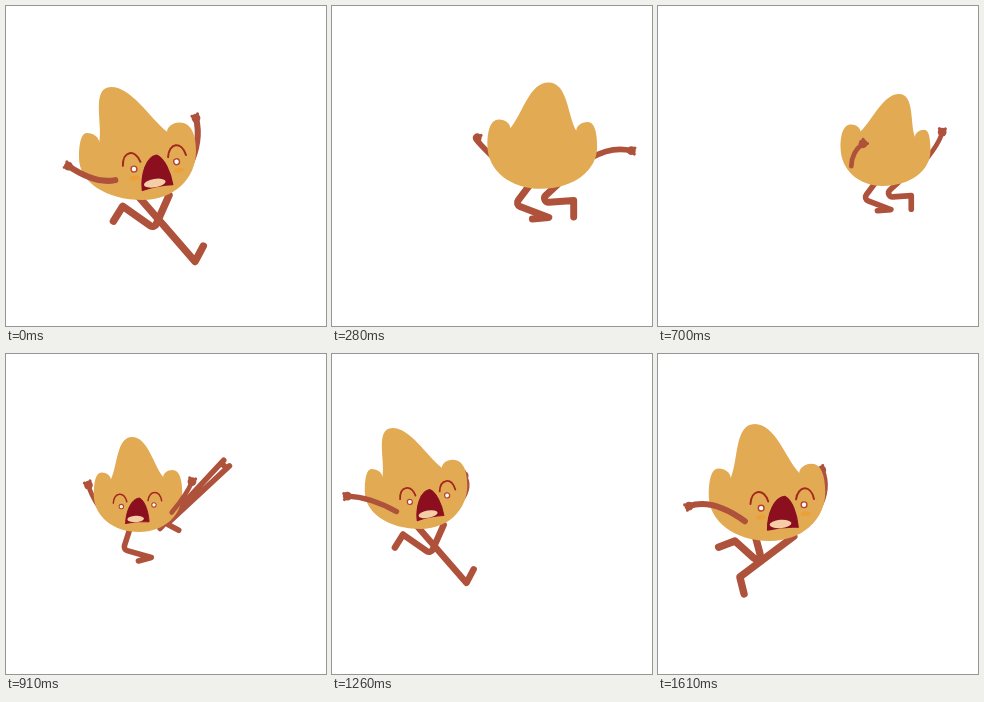
Recreate the animation shown at these times as an HTML page with a canvas. Size 320x320 px, loop 1.68 s.

```html
<!DOCTYPE html>
<html lang="en">
<head>
<meta charset="utf-8">
<title>Panic run</title>
<style>
  html, body { margin: 0; width: 100%; height: 100%; overflow: hidden; background: #fff; }
  canvas { display: block; width: 100vw; height: 100vh; }
</style>
</head>
<body>
<canvas id="stage" width="320" height="320"></canvas>
<script>
const ctx = document.getElementById('stage').getContext('2d');
const STEPS = 24, STEP_MS = 70;
const SKIN = '#e2aa53', LIMB = '#ae523c', DARK = '#8c0f1f', LINE = '#a5281f';

// step, body x, bottom y, height, then in body widths:
// lean of the top, face shift, left hand x,y, right hand x,y, left elbow bend
const KEYS = [
  [0, 131.5, 194, 113, -.226, .165, -.59, -.29, .5, -.7, -.1],
  [2, 221, 187, 110, -.07, .6, -.67, -.31, .82, -.31, .11],
  [6, 190.5, 180, 102, .15, 0, -.48, -.59, .74, -.46, .2],
  [10, 227.5, 180, 92, .15, -.75, -.25, -.47, .63, -.6, .07],
  [13, 132, 178, 95, -.067, 0, -.56, -.53, .61, -.57, .04],
  [16, 78, 175, 99, -.2, .12, -.67, -.36, .5, -.53, .06],
  [18, 84, 175, 101, -.23, .135, -.67, -.32, .47, -.52, .07],
  [23, 109, 187, 117, -.105, .14, -.67, -.3, .47, -.61, .14]
];

// A leg: hip x and thigh length in body widths, then thigh, shin and foot angles
// in degrees, as seen running to the right.
const REACH = [[0, .42, 49, 49, -62], [.27, .31, 114, 215, 122]];
const STRIDE = [
  REACH,
  [[.09, .25, 72, 164, 15], [-.25, .24, 47, 223, 152]],
  [[-.175, .16, 70, 70, 100], [.1, .18, 157, 42, 108]],
  REACH,
  [[.11, .23, 53, 159, 5], [-.14, .25, 43, 184, 90]],
  [[.23, .25, 143, 143, 76], [-.1, .27, 75, 222, 159]]
];
const SHIN = .33, FOOT = .15;

const mix = (a, b, u) => a + (b - a) * u;
const facesRight = i => i < 2 || i > 15;
const showsFace = i => i < 2 || i > 10;
const nearArm = i => facesRight(i) ? -1 : i > 11 ? 1 : i > 8 ? -1 : 0;

// Smooth looping curve through the key poses.
function poseAt(i) {
  const n = KEYS.length;
  const row = j => KEYS[(j + n) % n];
  const time = j => row(j)[0] + STEPS * Math.floor(j / n);
  let k = n - 1;
  while (KEYS[k][0] > i) k--;
  const span = time(k + 1) - time(k), u = (i - time(k)) / span;
  const slope = (j, c) => (row(j + 1)[c] - row(j - 1)[c]) / (time(j + 1) - time(j - 1));
  const [, x, y, h, lean, face, lx, ly, rx, ry, bend] = row(k).map((a, c) =>
    mix(a, row(k + 1)[c], u * u * (3 - 2 * u)) +
    span * u * (1 - u) * ((1 - u) * slope(k, c) - u * slope(k + 1, c)));
  // The run circles away from the viewer and back.
  const w = 102.5 + 14.5 * Math.cos(2 * Math.PI * i / STEPS);
  return { x, y, w, h, lean, face, left: [lx, ly], right: [rx, ry], bend };
}

function bodyPath({ w, h, lean }) {
  const top = [lean * w, -h], bottom = -.2 * lean * w;
  const p = new Path2D();
  const half = s => {
    const edge = s * w / 2;
    const lx = (s * .403 + (s < 0 ? .13 : .2) * lean) * w;
    const ly = -.64 * h + s * .2 * lean * w;
    const nx = lx - s * .105 * w, ny = ly + .08 * w, ey = ly * .63;
    return [
      [nx, ny],
      [nx, mix(ny, ly, .5), lx - s * .06 * w, ly, lx, ly],
      [mix(lx, edge, .75), ly, edge, mix(ly, ey, .45), edge, ey],
      [edge, ey * .43, mix(bottom, edge, .58), 0, bottom, 0]
    ];
  };
  // Each half runs from the top over the lobe down to the bottom.
  for (const s of [-1, 1]) {
    const [notch, ...curves] = half(s);
    p.moveTo(...top);
    p.bezierCurveTo(top[0] + s * .175 * w, top[1],
      mix(notch[0], top[0], .32), mix(notch[1], top[1], .32), ...notch);
    for (const c of curves) p.bezierCurveTo(...c);
    p.closePath();
  }
  return p;
}

function stroke(path, color, width) {
  ctx.strokeStyle = color;
  ctx.lineWidth = width;
  ctx.stroke(path);
}

function dot(x, y, rx, ry, color) {
  ctx.fillStyle = color;
  ctx.beginPath();
  ctx.ellipse(x, y, rx, ry, 0, 0, 7);
  ctx.fill();
}

function drawArm(pose, side, i) {
  const { w } = pose, near = nearArm(i) === side;
  const [ux, uy] = !near ? [.44, -.28] : facesRight(i) ? [.19, -.17] : [.38, -.22];
  const sx = side * ux * w, sy = uy * w;
  const [hx, hy] = (side < 0 ? pose.left : pose.right).map(v => v * w);
  const bend = (side < 0 ? pose.bend : .08) * w;
  const dx = Math.abs(hx - sx), dy = Math.abs(hy - sy), d = Math.hypot(dx, dy);
  // Elbows point outwards on raised arms and up on level ones.
  const ex = (sx + hx) / 2 + side * bend * dy / d;
  const ey = (sy + hy) / 2 - bend * dx / d;
  const arm = new Path2D(), fingers = new Path2D();
  arm.moveTo(sx, sy);
  arm.quadraticCurveTo(ex, ey, hx, hy);
  stroke(arm, LIMB, .052 * w);
  dot(hx, hy, 4.4, 4.4, LIMB);
  const a = Math.atan2(hy - ey, hx - ex);
  for (const turn of [-.9, .6]) {
    fingers.moveTo(hx, hy);
    fingers.lineTo(hx + 4.5 * Math.cos(a + turn), hy + 4.5 * Math.sin(a + turn));
  }
  stroke(fingers, LIMB, 3);
}

function drawLegs({ w }, i) {
  const dir = facesRight(i) ? 1 : -1;
  for (const [hip, thigh, ...angles] of STRIDE[i % STRIDE.length]) {
    let x = dir * hip * w, y = -.04 * w;
    const joints = angles.map((deg, j) => {
      const a = deg * Math.PI / 180, len = [thigh, SHIN, FOOT][j] * w;
      return [x += dir * len * Math.cos(a), y += len * Math.sin(a)];
    });
    const [knee, heel, toe] = joints, p = new Path2D();
    p.moveTo(dir * hip * w, -.04 * w);
    p.arcTo(...knee, ...heel, 4);
    p.lineTo(...heel);
    p.lineTo(...toe);
    stroke(p, LIMB, .063 * w);
  }
}

const mouth = new Path2D('M-17 13.5C-16-2-8-19 3-19C10-15 14 0 14 13Q-1 11-17 13.5Z');
const brow = new Path2D('M-32-14C-30-29-17-29-14-15');

function drawFace({ w, face, lean }, clip) {
  const scale = w / 117;
  ctx.save();
  ctx.clip(clip);
  ctx.translate(face * w, -.22 * w);
  ctx.rotate(.75 * lean);
  ctx.scale(scale, scale);
  for (const side of [1, -1]) {
    ctx.save();
    ctx.scale(side, 1);
    if (scale > .92) dot(-22.5, 0, 5, 2.4, '#ed9f38');
    stroke(brow, LINE, 2);
    dot(-21.6, -9, 3.6, 3.6, '#b8432c');
    dot(-21.6, -9, 2.2, 2.2, '#fff');
    ctx.restore();
  }
  ctx.fillStyle = DARK;
  ctx.fill(mouth);
  stroke(mouth, DARK, 1.2);
  dot(-3.5, 8.4, 11, 4.2, '#f5cda6');
  ctx.restore();
}

function draw(i) {
  const pose = poseAt(i), body = bodyPath(pose), near = nearArm(i);
  ctx.fillStyle = '#fff';
  ctx.fillRect(0, 0, 320, 320);
  ctx.lineCap = ctx.lineJoin = 'round';
  ctx.save();
  ctx.translate(pose.x, pose.y);
  drawLegs(pose, i);
  for (const side of [-1, 1]) if (side !== near) drawArm(pose, side, i);
  ctx.fillStyle = SKIN;
  ctx.fill(body);
  // Cover the seam between the two halves.
  const seam = new Path2D();
  seam.moveTo(pose.lean * pose.w, 3 - pose.h);
  seam.lineTo(-.2 * pose.lean * pose.w, -3);
  stroke(seam, SKIN, 4);
  if (showsFace(i)) drawFace(pose, body);
  if (near) drawArm(pose, near, i);
  ctx.restore();
}

const start = performance.now();
function tick() {
  draw(Math.floor((performance.now() - start) / STEP_MS) % STEPS);
  requestAnimationFrame(tick);
}
tick();
</script>
</body>
</html>
```
